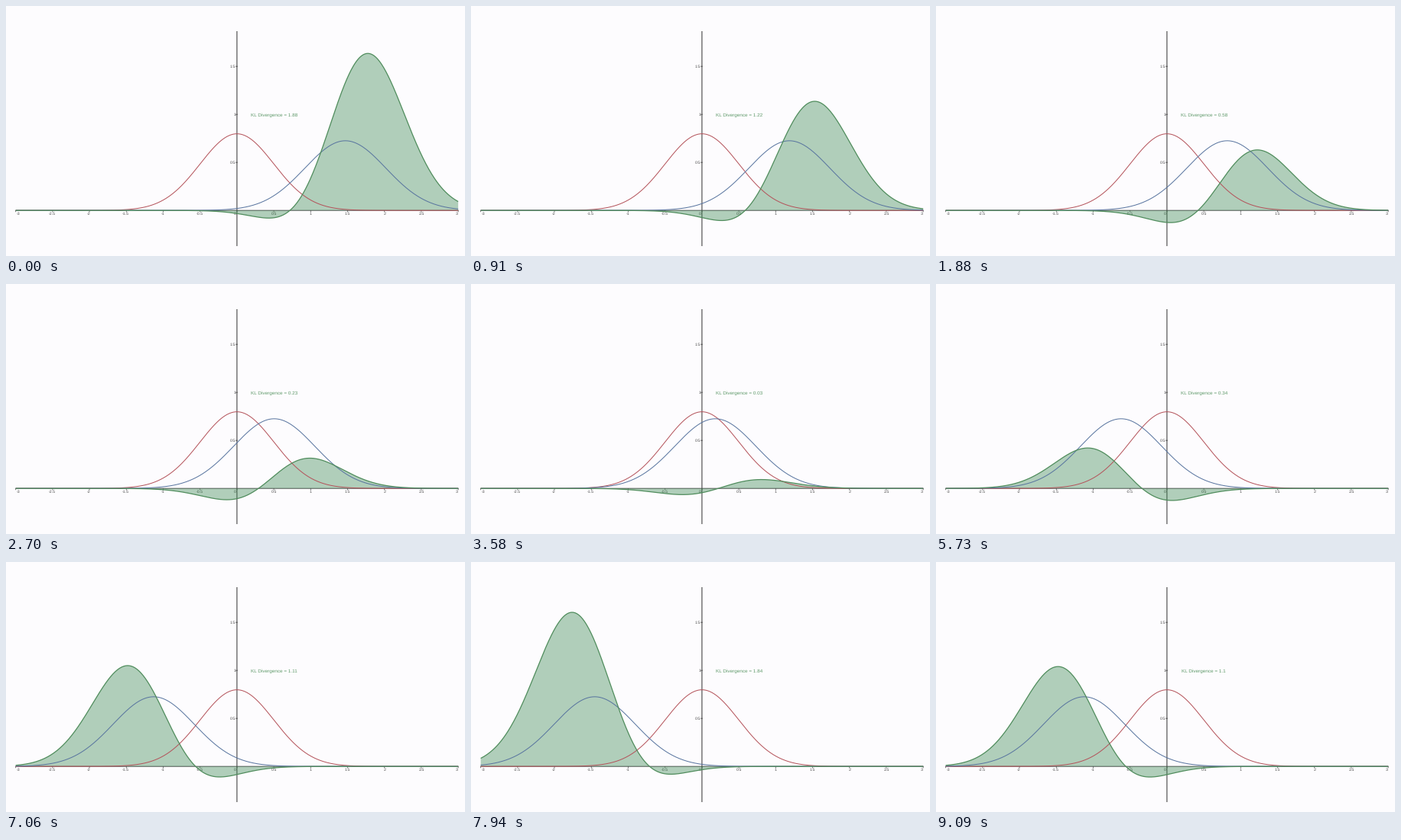
A matplotlib script for the animation above (9.12 s loop, 600 by 328 pixels).

```python
import numpy as np
import matplotlib.pyplot as plt
from matplotlib.animation import FuncAnimation

W, H, DPI = 600, 328, 100
PX = 72 / DPI                      # points per pixel
X0, Y0, SX, SY = 301.9, 268.2, 96.4, 126.0
INTERVAL, FRAMES = 30, 304
SIGMA_P, SIGMA_Q = 0.5, 0.55

BG, INK = "#fdfcfe", "#4c4c4c"
RED, BLUE, GREEN, FILL = "#b4525a", "#58749f", "#4f8c5c", "#b0ceb8"

plt.rcParams["font.family"] = "Liberation Sans"
plt.rcParams["text.hinting"] = "none"

# Slider path: the mean sweeps between 1.5 and -1.5 at a steady pace.
TIMES = [0, 78, 1880, 5730, 7060, 7940, 8062, 9090, 9120]
MEANS = [1.47, 1.5, 0.81, -0.622, -1.1334, -1.4617, -1.5, -1.123, -1.112]

xs = np.linspace(-3, 3, 601)


def log_normal(x, mean, sigma):
    return -((x - mean) / sigma) ** 2 / 2 - np.log(sigma * np.sqrt(2 * np.pi))


def px(x):
    return X0 + SX * np.asarray(x)


def py(y):
    return Y0 - SY * np.asarray(y)


def kl_divergence(mean):
    nats = (np.log(SIGMA_P / SIGMA_Q)
            + (SIGMA_Q ** 2 + mean ** 2) / (2 * SIGMA_P ** 2) - 0.5)
    return nats / np.log(10)


fig = plt.figure(figsize=(W / DPI, H / DPI), dpi=DPI, facecolor=BG)
ax = fig.add_axes([0, 0, 1, 1])
ax.set_xlim(0, W)
ax.set_ylim(H, 0)
ax.axis("off")


def line(x, y, color, width=1.0, z=3):
    return ax.plot(x, y, color=color, lw=width * PX, zorder=z, snap=False,
                   solid_capstyle="butt")[0]


def label(x, y, text, size=5.3, color=INK, ha="center", z=1):
    return ax.text(x, y, text, fontsize=size * PX, color=color, ha=ha,
                   va="baseline", zorder=z)


def draw_axes():
    line([X0, X0], [33, 315], INK, 1.15, 1)
    line([12.5, 591.5], [Y0, Y0], INK, 1, 1)
    for k in range(-6, 7):
        v = k / 2
        x = float(px(v))
        line([x, x], [Y0, Y0 + 2], INK, 0.8, 1)
        shift = {-6: 3.2, 0: -2.9, 6: -2.2}.get(k, -0.6 if k < 0 else 0)
        label(x + shift, 274.1, f"{v:g}")
    for v in (0.5, 1, 1.5):
        y = float(py(v))
        line([X0 - 1.8, X0 + 1], [y, y], INK, 0.9, 1)
        label(300.3, y + 1.9, f"{v:g}", ha="right")


draw_axes()
area, = ax.fill(px(xs), py(0 * xs), color=FILL, lw=0, zorder=2)
area.set_facecolor((0.22, 0.53, 0.31, 0.39))
log_p = log_normal(xs, 0, SIGMA_P)
line(px(xs), py(np.exp(log_p)), RED)
blue = line(px(xs), py(0 * xs), BLUE)
green = line(px(xs), py(0 * xs), GREEN, 1.25, 4)
readout = label(350.3, 144.7, "", 6.33, "#5f9a6a", z=5)


def update(i):
    mean = np.interp(i * INTERVAL, TIMES, MEANS)
    log_q = log_normal(xs, mean, SIGMA_Q)
    q = np.exp(log_q)
    integrand = q * (log_q - log_p) / np.log(10)

    blue.set_ydata(py(q))
    green.set_ydata(py(integrand))
    edge = np.column_stack([px(xs), py(integrand)])
    area.set_xy(np.vstack([[px(-3), Y0], edge, [px(3), Y0]]))
    readout.set_text(f"KL Divergence = {round(kl_divergence(mean), 2):g}")
    return area, blue, green, readout


anim = FuncAnimation(fig, update, frames=FRAMES, interval=INTERVAL,
                     repeat=True, repeat_delay=0, blit=False)
plt.show()
```
